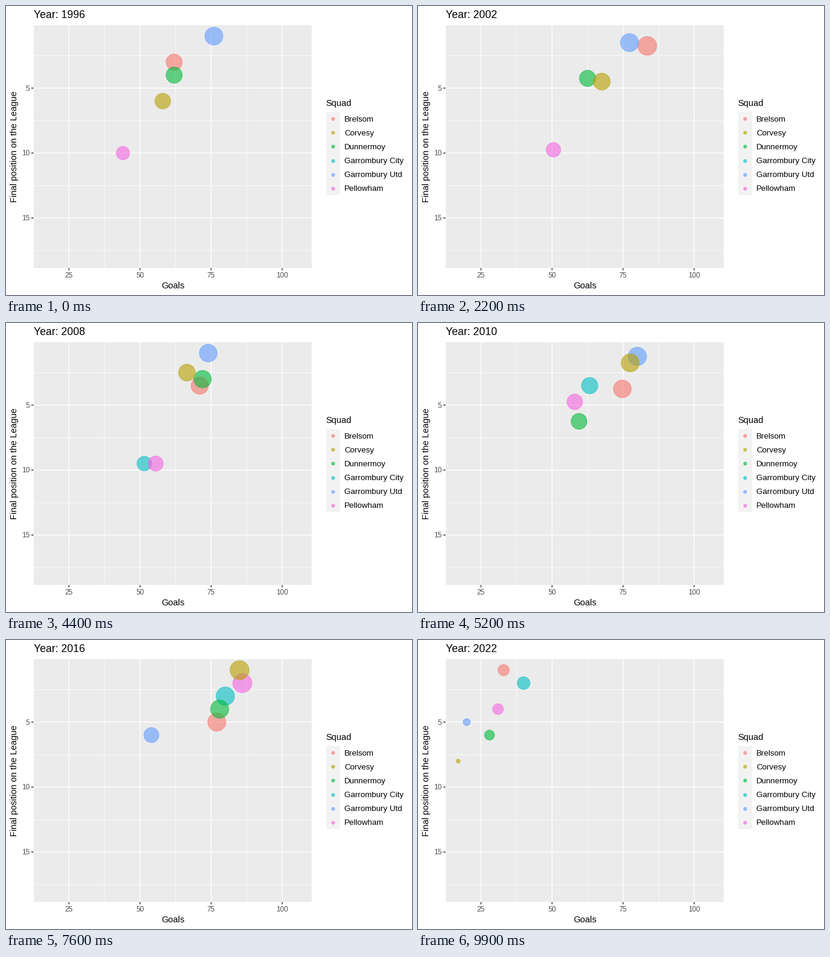
A matplotlib script for the animation above (10 s loop, 672 px wide and 480 px high).

```python
import numpy as np
import matplotlib.pyplot as plt
from matplotlib.animation import FuncAnimation
from matplotlib.colors import to_rgba
from matplotlib.patches import Rectangle

plt.rcParams["font.family"] = "Liberation Sans"

W, H, DPI = 672, 480, 96
FRAMES, INTERVAL = 100, 100
FIRST, LAST = 1996, 2022
SPAN = LAST - FIRST
LEFT, RIGHT, TOP, BOTTOM = 45.6, 506.3, 31.7, 435.3
X_RANGE, Y_RANGE = (12.55, 110.45), (0.15, 18.85)
GOALS_MIN, GOALS_MAX = 17, 106
ALPHA = 0.6
PT = 0.75  # points per pixel
STROKE = 0.945
NA = np.nan

# Key frame of each season
keys = [round(1 + k * (FRAMES - 1) / SPAN) - 1 for k in range(SPAN + 1)]


def px(goals):
    return np.interp(goals, X_RANGE, (LEFT, RIGHT))


def py(place):
    return np.interp(place, Y_RANGE, (TOP, BOTTOM))


def dot_size(goals):
    share = (np.asarray(goals, float) - GOALS_MIN) / (GOALS_MAX - GOALS_MIN)
    return 2 + 10 * np.sqrt(share)


def area(size):
    """Scatter area in square points of a dot of the given size in mm."""
    return (0.75 * (size * 72.27 / 25.4 + STROKE)) ** 2


squads = []


def squad(name, color, goals, places):
    squads.append(dict(name=name, color=to_rgba(color, ALPHA),
                       goals=np.array(goals, float),
                       places=np.array(places, float),
                       sizes=dot_size(goals)))


squad("Brelsom", "#F8766D",
      [62, 68, 59, 73, 63, 79, 85, 73, 87, 68, 63, 74, 68, 83,
       72, 74, 72, 68, 71, 65, 77, 74, 73, 56, 55, 61, 33],
      [3, 1, 2, 2, 2, 1, 2, 1, 2, 4, 4, 3, 4, 3,
       4, 3, 4, 4, 3, 2, 5, 6, 5, 8, 8, 5, 1])
squad("Corvesy", "#B79F00",
      [58, 71, 57, 53, 68, 66, 68, 67, 72, 72, 64, 65, 68, 103,
       69, 65, 75, 71, 73, 59, 85, 62, 63, 69, 58, 76, 17],
      [6, 4, 3, 5, 6, 6, 4, 2, 1, 1, 2, 2, 3, 1,
       2, 6, 3, 3, 1, 10, 1, 5, 3, 4, 4, 3, 8])
squad("Dunnermoy", "#00BA38",
      [62, 68, 68, 51, 71, 67, 61, 55, 52, 57, 57, 67, 77, 61,
       59, 47, 71, 101, 52, 63, 78, 84, 89, 85, 68, 94, 28],
      [4, 3, 7, 4, 3, 2, 5, 4, 5, 3, 3, 4, 2, 7,
       6, 8, 7, 2, 6, 8, 4, 4, 2, 1, 3, 2, 6])
squad("Garrombury City", "#00BFC4",
      [NA, NA, NA, NA, 41, NA, 47, 55, 47, 43, 29, 45, 58, 73,
       60, 93, 66, 102, 83, 71, 80, 106, 95, 102, 83, 99, 40],
      [NA, NA, NA, NA, 18, NA, 9, 16, 8, 15, 14, 9, 10, 5,
       3, 1, 2, 1, 2, 4, 3, 1, 1, 2, 1, 1, 2])
squad("Garrombury Utd", "#619CFF",
      [76, 73, 80, 97, 79, 87, 74, 64, 58, 72, 83, 80, 68, 86,
       78, 89, 86, 64, 62, 49, 54, 68, 65, 66, 73, 57, 20],
      [1, 2, 1, 1, 1, 3, 1, 3, 3, 2, 1, 1, 1, 2,
       1, 2, 1, 7, 4, 5, 6, 2, 6, 3, 2, 6, 5])
squad("Pellowham", "#F564E3",
      [44, 44, 47, 57, 47, 49, 51, 47, 47, 53, 57, 66, 45, 67,
       55, 66, 66, 55, 58, 69, 86, 74, 67, 61, 68, 69, 31],
      [10, 14, 11, 10, 12, 9, 10, 14, 9, 5, 5, 11, 8, 4,
       5, 4, 5, 6, 5, 3, 2, 3, 4, 6, 7, 4, 4])

stack = [squads[i] for i in (0, 3, 4, 5, 2, 1)]  # back to front
colors = np.array([s["color"] for s in stack])

fig = plt.figure(figsize=(W / DPI, H / DPI), dpi=DPI, facecolor="white")
ax = fig.add_axes([0, 0, 1, 1])
ax.set(xlim=(0, W), ylim=(H, 0))
ax.axis("off")


def box(x0, y0, x1, y1, color):
    ax.add_patch(Rectangle((x0, y0), x1 - x0, y1 - y0, fc=color, lw=0, zorder=0))


def line(xs, ys, color, width, z):
    ax.plot(xs, ys, color=color, lw=width * PT, zorder=z,
            solid_capstyle="butt", snap=False)


def label(x, y, text, size, color="black", ha="left", **kw):
    return ax.text(x, y, text, fontsize=size, color=color, ha=ha,
                   va="baseline", **kw)


# Panel with grid and axes
box(46, 32, 506, 435, "#EBEBEB")
for g in (37.5, 62.5, 87.5):
    line([px(g)] * 2, [TOP, BOTTOM], "white", 0.71, 1)
for p in (2.5, 7.5, 12.5, 17.5):
    line([LEFT, RIGHT], [py(p)] * 2, "white", 0.71, 1)
for g in (25, 50, 75, 100):
    x = px(g)
    line([x, x], [TOP, BOTTOM], "white", 1.42, 2)
    line([x, x], [BOTTOM, BOTTOM + 3.67], "#333333", 1.42, 2)
    label(x, 451, str(g), 8.8, "#4D4D4D", "center")
for p in (5, 10, 15):
    y = py(p)
    line([LEFT, RIGHT], [y, y], "white", 1.42, 2)
    line([LEFT - 3.67, LEFT], [y, y], "#333333", 1.42, 2)
    label(39, y + 4.2, str(p), 8.8, "#4D4D4D", "right")

label((LEFT + RIGHT) / 2, 469, "Goals", 11, ha="center")
label(18, (TOP + BOTTOM) / 2, "Final position on the League", 11, ha="center",
      rotation=90, rotation_mode="anchor")
title = label(LEFT, 20, "", 13.2)

# Legend
label(529.8, 166, "Squad", 11)
box(530, 176, 553, 314, "#F2F2F2")
for i, s in enumerate(squads):
    y = 187.4 + 23.04 * i
    ax.scatter([541.3], [y], s=area(1.5), color=[s["color"]],
               lw=STROKE * PT, zorder=3)
    label(560.2, y + 4.6, s["name"], 10)

dots = ax.scatter([], [], lw=STROKE * PT, zorder=3)


def update(frame):
    goals, places, sizes = (
        np.array([np.interp(frame, keys, s[k]) for s in stack])
        for k in ("goals", "places", "sizes"))
    on = ~np.isnan(goals)
    dots.set_offsets(np.column_stack([px(goals[on]), py(places[on])]))
    dots.set_sizes(area(sizes[on]), DPI)
    dots.set_facecolor(colors[on])
    dots.set_edgecolor(colors[on])
    title.set_text(f"Year: {round(FIRST + SPAN * frame / (FRAMES - 1))}")
    return dots, title


anim = FuncAnimation(fig, update, frames=FRAMES, interval=INTERVAL,
                     repeat=True, repeat_delay=0)
plt.show()
```
